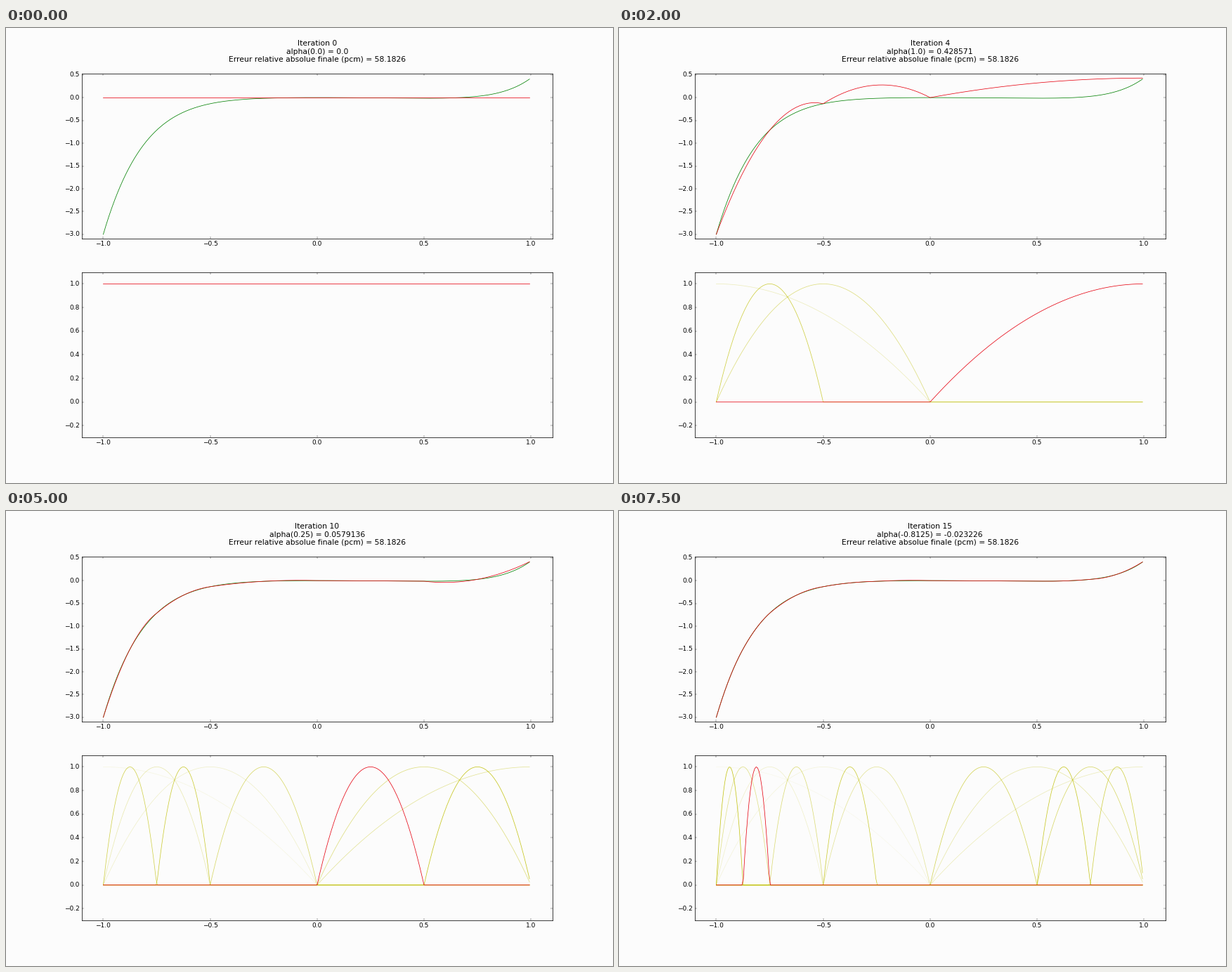
A matplotlib script for the animation above (8 s loop, 864 px wide and 648 px high).

```python
import matplotlib.pyplot as plt
import numpy as np
from matplotlib.animation import FuncAnimation

BG, RED, GREEN, YELLOW = "#fcfcfc", "#e6000e", "#008000", "#bfbf00"
NODES = [0.0, -1.0, -0.5, -0.75, 1.0, 0.5, -0.25, -0.875,
         -0.625, 0.75, 0.25, 0.875, -0.375, 0.625, -0.9375, -0.8125]

plt.style.use("classic")
plt.rcParams.update({
    "font.family": "DejaVu Sans",
    "figure.facecolor": BG,
    "axes.facecolor": BG,
    "savefig.facecolor": BG,
    "savefig.dpi": "figure",
})


def func(x):
    return sum((-1) ** (k - 1) * (k - 1) * x ** k for k in range(2, 8)) / 7


def basis(node, x):
    """Quadratic hat whose half-width is set by the node's dyadic level."""
    if node == 0:
        return np.ones_like(x)
    width = 1 / node.as_integer_ratio()[1]
    return np.clip(1 - ((x - node) / width) ** 2, 0, None)


def interpolant(count, x):
    x = np.asarray(x, dtype=float)
    return sum((a * basis(m, x) for a, m in zip(surplus[:count], NODES)),
               np.zeros_like(x))


def number(v):
    text = f"{v:.6g}"
    return text if "." in text else text + ".0"


surplus = []
for i, m in enumerate(NODES):
    surplus.append(float(func(m) - interpolant(i, m)))

x = -1 + np.arange(300) / 150

fig, (top, low) = plt.subplots(2, 1, figsize=(16, 12), dpi=54)
fig.subplots_adjust(left=0.125, right=0.9, bottom=0.1, top=0.9, hspace=0.2)
top.set(xlim=(-1.1, 1.1), ylim=(func(-1) - 0.1, func(1) + 0.1))
low.set(xlim=(-1.1, 1.1), ylim=(-0.3, 1.1))

top.plot(x, func(x), color=GREEN, lw=1)
approx, = top.plot(x, 0 * x, color=RED, lw=1)
past = [low.plot(x, basis(m, x), color=YELLOW, lw=1)[0] for m in NODES]
current, = low.plot(x, 0 * x, color=RED, lw=1)
title = fig.text(0.5125, 1 - 17 / 648, "", size=14.4, ha="center", va="top")


def update(n):
    approx.set_ydata(interpolant(n + 1, x))
    current.set_ydata(basis(NODES[n], x))
    for i, line in enumerate(past):
        line.set_visible(0 < i < n)
        line.set_alpha(min(1, i / max(n, 1)))
    title.set_text(f"Iteration {n}\n"
                   f"alpha({NODES[n]}) = {number(surplus[n])}\n"
                   "Erreur relative absolue finale (pcm) = 58.1826")
    return [approx, current, title, *past]


anim = FuncAnimation(fig, update, frames=len(NODES), interval=500,
                     repeat=True, repeat_delay=0)
plt.show()
```
